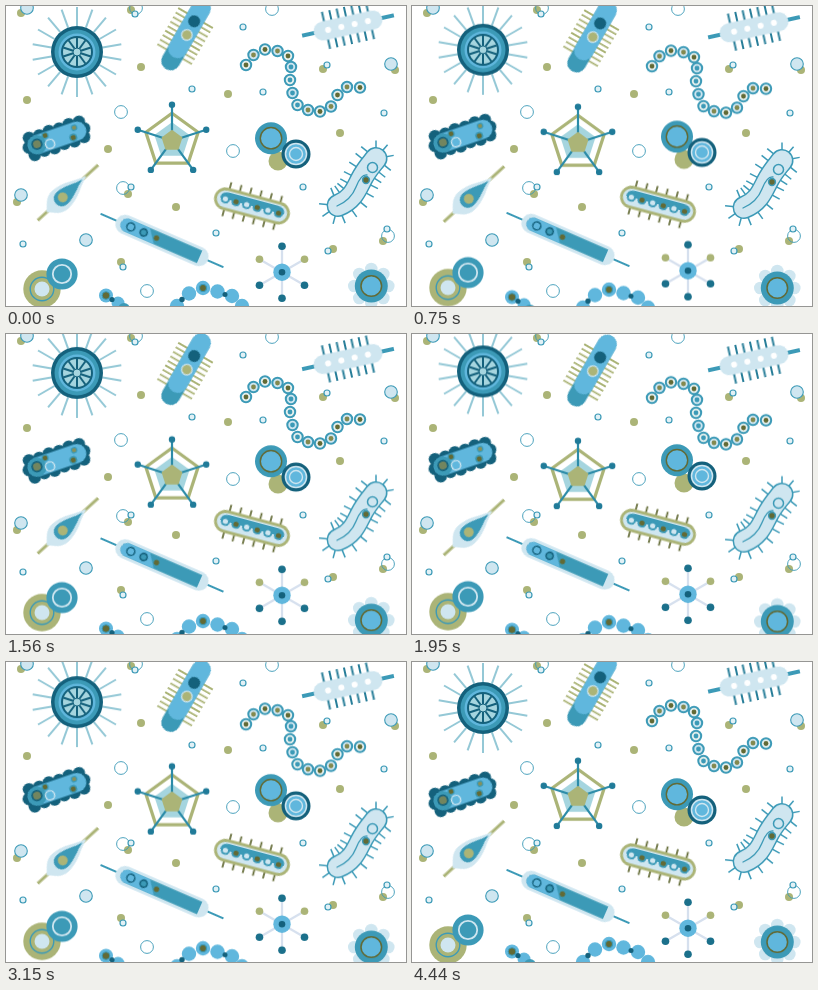
An HTML page for the animation above (4500 ms loop, 400 px wide and 300 px high).

```html
<!DOCTYPE html>
<html lang="en">
<head>
<meta charset="utf-8">
<title>Microbes</title>
<style>
html, body { margin: 0; width: 100%; height: 100%; overflow: hidden; background: #fff; }
svg { display: block; width: 400px; height: 300px; }
</style>
</head>
<body>
<svg id="stage" viewBox="0 0 400 300" fill="none"></svg>
<script>
const DARK = '#14617c', TEAL = '#3c9ab7', SKY = '#60b7dd', PALE = '#cfe6f0',
      AQUA = '#a5d5df', OLIVE = '#abb477', MOSS = '#626a35', WHITE = '#fff';
const LOOP = 4500;
const stage = document.getElementById('stage');

const range = (n, fn) => Array.from({ length: n }, (_, i) => fn(i)).join('');
const polar = (r, deg) => [r * Math.cos(deg * Math.PI / 180), r * Math.sin(deg * Math.PI / 180)];
const disc = (x, y, r, fill, stroke = 'none', w = 1) =>
  `<circle cx="${x}" cy="${y}" r="${r}" fill="${fill}" stroke="${stroke}" stroke-width="${w}"/>`;
const line = (x1, y1, x2, y2, color, w) =>
  `<line x1="${x1}" y1="${y1}" x2="${x2}" y2="${y2}" stroke="${color}" stroke-width="${w}"/>`;
const pill = (x, y, w, h, fill, stroke = 'none', sw = 1) =>
  `<rect x="${x}" y="${y}" width="${w}" height="${h}" rx="${Math.min(w, h) / 2}" fill="${fill}" stroke="${stroke}" stroke-width="${sw}"/>`;
const path = (d, fill, stroke = 'none', w = 1) =>
  `<path d="${d}" fill="${fill}" stroke="${stroke}" stroke-width="${w}" stroke-linecap="round"/>`;
const at = (x, y, deg, body) => `<g transform="translate(${x} ${y}) rotate(${deg})">${body}</g>`;
const spoke = (r1, r2, deg, color, w) => line(...polar(r1, deg), ...polar(r2, deg), color, w);
const pentagon = (r, fill, stroke = 'none', w = 0) =>
  `<polygon points="${range(5, i => polar(r, i * 72 - 90) + ' ')}" fill="${fill}" stroke="${stroke}" stroke-width="${w}"/>`;

// Appends a drawing that drifts dy pixels and back; peak is the turning point within the loop.
function drift(dy, markup, peak = 0.5) {
  const g = document.createElementNS('http://www.w3.org/2000/svg', 'g');
  g.innerHTML = markup;
  stage.append(g);
  const easing = 'cubic-bezier(.37,0,.63,1)', rest = 'translate(0px, 0px)';
  if (dy) g.animate([
    { transform: rest, easing },
    { transform: `translate(0px, ${dy}px)`, offset: peak, easing },
    { transform: rest }
  ], { duration: LOOP, iterations: Infinity });
  return g;
}

const olives = [[15,7],[125,4],[135,61],[222,88],[317,63],[389,64],[334,127],[21,94],[102,143],
  [11,196],[122,188],[170,201],[115,256],[327,243],[377,235]];
const clear = [[130,2],[266,3],[115,106],[227,145],[117,182],[141,285],[382,230]];
const misty = [[21,2],[385,58],[15,189],[80,234]];
const tiny = [[129,8],[237,21],[186,83],[257,86],[321,59],[378,107],[125,181],[297,181],
  [210,227],[17,238],[117,261],[322,245],[381,223]];
drift(0,
  olives.map(p => disc(...p, 4, OLIVE)).join('') +
  clear.map(p => disc(...p, 6.4, 'none', TEAL, 0.9)).join('') +
  misty.map(p => disc(...p, 6.3, PALE, TEAL, 1.1)).join('') +
  tiny.map(p => disc(...p, 3, '#e2f1f6', TEAL, 1.2)).join(''));

// Rayed sphere
drift(-9, at(71, 46, 0,
  range(18, i => spoke(26, 45, i * 20 - 90, '#94c8d6', 2)) +
  disc(0, 0, 26, DARK) + disc(0, 0, 22.5, TEAL) + disc(0, 0, 18.5, SKY) +
  disc(0, 0, 15, AQUA, DARK, 2) +
  range(10, i => spoke(4, 14.5, i * 36 - 90, DARK, 2)) + disc(0, 0, 4, AQUA, DARK, 1)));

// Bristled rod
drift(8.5, at(180, 28.5, 30,
  range(9, i => line(-20, i * 5.2 - 19, 20, i * 5.2 - 19, OLIVE, 1.8)) +
  pill(-9.5, -40, 19, 80, TEAL) + pill(-9.5, -40, 19, 66, SKY) +
  disc(0.5, -15.5, 6, DARK) + disc(1, 0, 5.3, OLIVE, PALE, 1.2)));

// Pale capsule with a rod through it
drift(7, at(342, 19.5, -12.5,
  line(-47, 0, 47, 0, TEAL, 4) +
  range(7, i => line(i * 7.5 - 22.5, -19, i * 7.5 - 22.5, 19, '#287e99', 2)) +
  pill(-35, -9.5, 70, 19, PALE) +
  range(4, i => disc(i * 13.6 - 20.4, 0, 3, WHITE))));

// Long bead chain
const beads = [[240,59],[247.5,49],[259,43.5],[271.5,45],[282,50],[285,61],[284,74],[286.5,87],
  [291.5,99],[302,104],[314,105.5],[325,100.5],[331.5,89],[341,81],[354,81.5]];
drift(5, beads.map(([x, y], i) =>
  disc(x, y, 5.2, i % 2 ? PALE : '#e5f0ee', TEAL, 2) +
  disc(x, y, 2.4, i > 4 && i < 9 ? TEAL : i % 2 ? '#83894f' : MOSS)).join(''));

// Scalloped blob
drift(-7, at(50.5, 132, -19,
  range(6, i => disc(i * 10.5 - 26, -9 + (i % 2), 6.2, DARK) + disc(i * 10.5 - 26, 9 - (i % 2), 6.2, DARK)) +
  disc(-29, 0, 6.5, DARK) + disc(29, 0, 6.5, DARK) +
  pill(-30, -9.5, 61, 19, SKY) + disc(-20.5, 0, 9.5, TEAL) +
  disc(-20.5, -.5, 4.8, '#72855f', DARK, 1.7) + disc(-8, 3.5, 4.6, SKY, PALE, 1.4) +
  disc(-10, -6, 3, MOSS, TEAL, 1.2) + disc(16, 5, 3.3, MOSS, TEAL, 1.5) +
  disc(20, -4, 2.7, '#87905a', TEAL, 1.3)));

// Pentagon virus
drift(8.5, at(166, 134.8, 0,
  pentagon(27.5, WHITE, OLIVE, 3.2) + pentagon(18.5, AQUA) +
  range(5, i => spoke(10, 36, i * 72 - 90, '#2b8ba8', 2.2)) +
  range(5, i => disc(...polar(36, i * 72 - 90), 3.2, '#207b99')) +
  pentagon(11, OLIVE)));

// Three cells
drift(-6.3,
  disc(272, 155, 9.5, OLIVE) +
  disc(265, 132.2, 16, TEAL) + disc(265, 132.2, 10.7, SKY, MOSS, 1.4) +
  disc(290, 148, 14.5, DARK) + disc(290, 148, 11.3, PALE) +
  disc(290, 148, 9.8, SKY) + disc(290, 148, 6.5, SKY, PALE, 1.4));

// Drop with a tail
drift(8.3, at(60.5, 188, -42.5,
  line(-39, 0, 43, 0, OLIVE, 3.2) +
  path('M27 0C16-3 6-12-8-12C-19-12-21-5-27 0C-21 5-19 12-8 12C6 12 16 3 27 0Z', PALE) +
  path('M22 0C12-2 4-8-6-8C-17-8-17 8-6 8C4 8 12 2 22 0Z', TEAL) +
  disc(-5, 0, 4.9, OLIVE)), 0.6);

// Long spindle
drift(-5.6, at(156, 234.5, 23.5,
  line(-67, 0, 67, 0, TEAL, 2) +
  pill(-50, -9.7, 100, 19.4, PALE) +
  path('M-38-6.7H41V6.7H-38A6.7 6.7 0 0 1-38-6.7Z', TEAL) +
  path('M-38-6.7H-16L-6 6.7H-38A6.7 6.7 0 0 1-38-6.7Z', SKY) +
  disc(-34, 0, 4, SKY, DARK, 1.5) + disc(-20, 0, 3.6, TEAL, DARK, 1.6) + disc(-6, 0, 2.7, MOSS)), 0.6);

// Oval capsule with a scalloped core
drift(-7, at(246, 200, 15,
  range(6, i => line(i * 10.5 - 26, -17.5, i * 10.5 - 26, 17.5, MOSS, 1.7)) +
  pill(-37.5, -10, 75, 20, PALE, OLIVE, 2.8) +
  path('M-33 0Q-33-7-25-7H25Q33-7 33 0Z', TEAL) +
  range(6, i => disc(i * 11 - 27.5, 0, 4.6, TEAL) +
    disc(i * 11 - 27.5, 0, 2.6, i % 2 ? MOSS : PALE))));

// Hairy bacterium
const spine = 'M332 199.5C346 194 350 184 355 174S364 160 370 152.5';
const hairy = drift(8, '<g></g>' +
  path(spine, 'none', TEAL, 23) + path(spine, 'none', PALE, 20) +
  path('M331 200Q345 194 350 181T361 169', 'none', TEAL, 1.3) +
  disc(366.5, 161.5, 5, PALE, TEAL, 1.5) + disc(360, 174, 3.4, MOSS, TEAL, 1.5));
const curve = hairy.querySelector('path'), len = curve.getTotalLength();
hairy.firstChild.innerHTML = range(8, i => {
  const s = len * i / 7, a = curve.getPointAtLength(Math.max(0, s - 1)),
        b = curve.getPointAtLength(Math.min(len, s + 1)), p = curve.getPointAtLength(s);
  const deg = Math.atan2(b.y - a.y, b.x - a.x) * 180 / Math.PI;
  return at(p.x, p.y, deg, line(0, -19, 0, 19, TEAL, 1.5));
}) + at(332, 199.5, 0, range(3, i => spoke(9, 19, 105 + i * 40, TEAL, 1.5))) +
  at(370, 152.5, 0, range(3, i => spoke(9, 18, i * 40 - 90, TEAL, 1.5)));

// Six-armed molecule
drift(-6.2, at(276, 266.2, 0,
  range(6, i => spoke(7, 26, i * 60 - 90, '#d6e0ee', 2.3)) +
  range(6, i => disc(...polar(26, i * 60 - 90), 3.8, i === 1 || i === 5 ? OLIVE : '#1b708b')) +
  disc(0, 0, 8.7, SKY) + disc(0, 0, 3.3, DARK)));

// Ringed pair
drift(-5.6,
  disc(36, 283, 18.7, OLIVE) + disc(36, 283, 11.8, OLIVE, TEAL, 1.4) + disc(36, 283, 7.5, PALE) +
  disc(56, 268, 15.6, TEAL) + disc(56, 268, 9.2, TEAL, PALE, 1.8));

// Flower cell
drift(7.8, at(365.3, 280, 0,
  range(8, i => disc(...polar(17, i * 45), 6.3, PALE)) +
  disc(0, 0, 16.5, TEAL) + disc(0, 0, 10.3, SKY, MOSS, 1.5)));

// Lower bead chains
const lower = [[171,300],[183,287.5],[197,282],[211.5,285.5],[226,290],[236,300]];
drift(6.5,
  disc(100, 289.5, 7, SKY) + disc(100, 289.5, 3.8, MOSS, TEAL, 1) +
  disc(112, 297, 6.5, SKY) + disc(106, 293.5, 2.6, DARK) + disc(118, 303, 6, TEAL) +
  lower.map(p => disc(...p, 7.2, SKY)).join('') +
  disc(176, 293.5, 2.7, DARK) + disc(219, 288.5, 2.5, DARK) +
  disc(197, 282, 3.5, MOSS, TEAL, 1.2));
</script>
</body>
</html>
```
